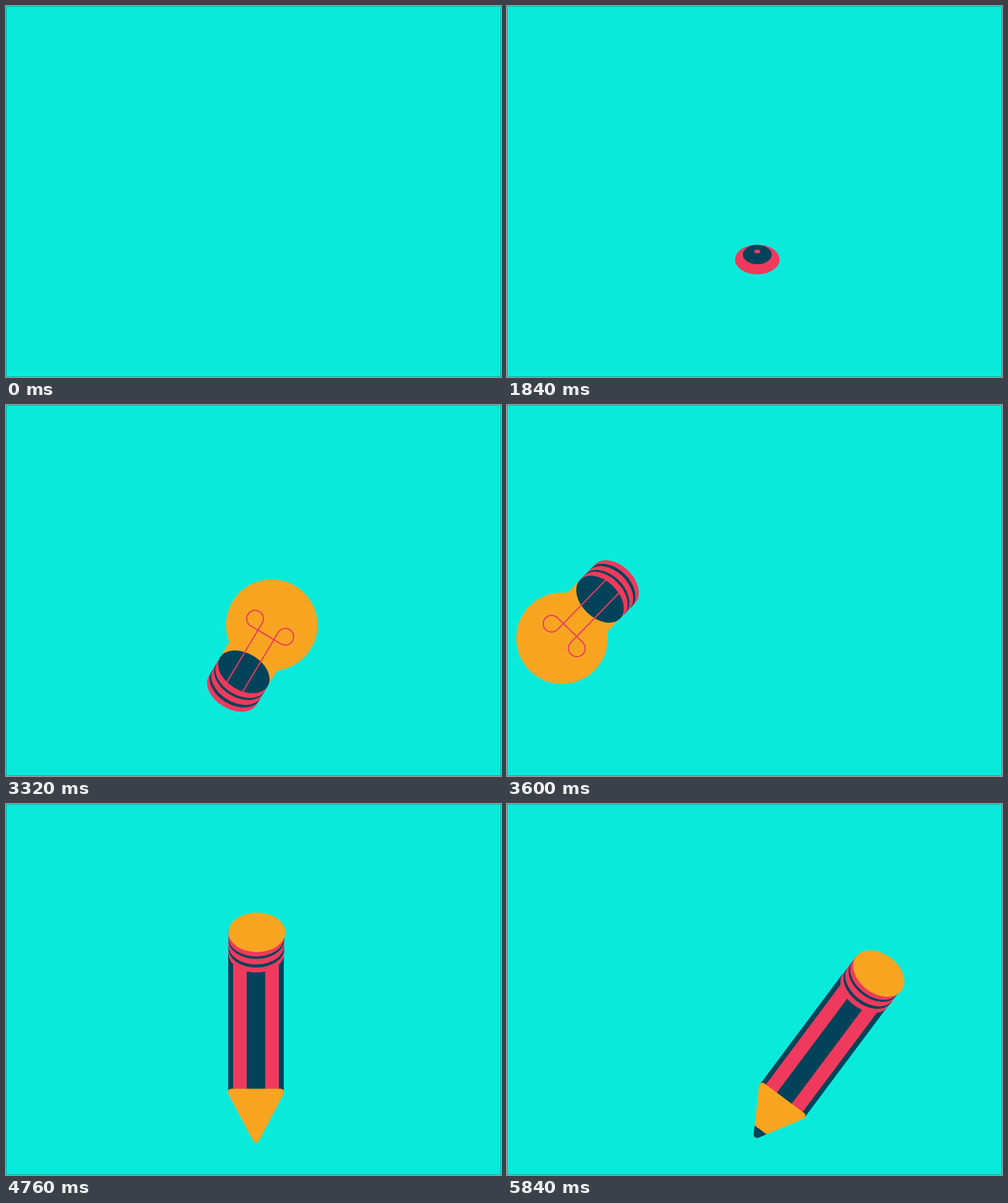
An HTML page with a canvas that plays this animation: 800x600 px, repeating every 6.04 s.

```html
<!DOCTYPE html>
<html>
<head>
<meta charset="utf-8">
<style>
html, body { margin: 0; width: 100%; height: 100%; overflow: hidden; background: #0aeadb }
canvas { display: block }
</style>
</head>
<body>
<canvas id="stage" width="800" height="600"></canvas>
<script>
const c = document.getElementById('stage').getContext('2d');
const TEAL = '#0aeadb', ORANGE = '#f7a521', PINK = '#ef3a5d', NAVY = '#02435a';
const LOOP = 6040, STEP = 40, RAD = Math.PI / 180, X = 404.5;
const PIVOT = { x: 403, y: 534.5 };
const LAYERS = [410, 402, 397, 388, 384, 375];

const span = (t, a, b) => Math.min(1, Math.max(0, (t - a) / (b - a)));
const mix = (a, b, k) => a + (b - a) * k;
const sine = u => (1 - Math.cos(Math.PI * u)) / 2;
const inOut = u => u < .5 ? 4 * u ** 3 : 1 - (2 - 2 * u) ** 3 / 2;
const backOut = (u, s = 1.7) => u <= 0 ? 0 : 1 + (s + 1) * (u - 1) ** 3 + s * (u - 1) ** 2;
const hermite = (u, a, va, b, vb) =>
  a * (2 * u ** 3 - 3 * u * u + 1) + va * (u ** 3 - 2 * u * u + u) +
  b * (3 * u * u - 2 * u ** 3) + vb * (u ** 3 - u * u);
const bezier = (s, p0, p1, p2, p3) => {
  const r = 1 - s;
  return r ** 3 * p0 + 3 * r * r * s * p1 + 3 * r * s * s * p2 + s ** 3 * p3;
};

function oval(x, y, rx, ry, color) {
  if (rx <= 0) return;
  c.fillStyle = color;
  c.beginPath();
  c.ellipse(x, y, rx, ry, 0, 0, 2 * Math.PI);
  c.fill();
}

function box(x, y, w, h, color) {
  c.fillStyle = color;
  c.fillRect(x, y, w, h);
}

function turn(x, y, deg) {
  c.translate(x, y);
  c.rotate(deg * RAD);
  c.translate(-x, -y);
}

function ball(t) {
  if (t <= 0 || t >= 1760) return;
  const s = 1 - (1 - span(t, 0, 1290)) ** 3.2;
  const fall = span(t, 1290, 1760) ** 2;
  const x = bezier(s, -14, 300, 500, 406) - 1.5 * fall;
  const y = bezier(s, 366, 366, 260, 110) + 300 * fall;
  oval(x, y, 13, 13, PINK);
}

// The bulb drops away, loops clockwise and lands with a wobble.
function loopPose(t) {
  if (t <= 3040 || t >= 4220) return;
  if (t >= 3860) {
    const d = t - 3860;
    const fade = 1 - span(t, 4140, 4220);
    turn(X, 440, 11 * fade * Math.exp(-d / 300) * Math.sin(2 * Math.PI * d / 180));
    return;
  }
  const turns = t < 3320
    ? .051 * ((t - 3040) / 280) ** 2
    : hermite((t - 3320) / 540, .051, .197, 1, .6);
  const phi = Math.min(1, turns) * 2 * Math.PI;
  const lead = 45 * Math.max(0, Math.sin(phi / 2)) ** .7;
  c.translate(-280 * ((1 - Math.cos(phi)) / 2) ** 1.5, 196 * Math.sin(phi));
  turn(X, 338, phi / RAD + lead);
}

function tilt(t) {
  const keys = [[5040, 0], [5200, -10], [5500, 41.5], [5680, 33.8], [5800, 36.8]];
  let angle = 0;
  for (let i = 1; i < keys.length; i++) {
    const [a, from] = keys[i - 1], [b, to] = keys[i];
    if (t >= a) angle = mix(from, to, sine(span(t, a, b)));
  }
  return angle;
}

function trail(t, lag, color) {
  const a = tilt(t - lag) * RAD, b = tilt(t) * RAD;
  if (t < 5200 || t > 5680 || a >= b) return;
  const at = (x, y, r) => [
    PIVOT.x + x * Math.cos(r) - y * Math.sin(r),
    PIVOT.y + x * Math.sin(r) + y * Math.cos(r)
  ];
  c.fillStyle = color;
  c.beginPath();
  c.moveTo(...at(0, -72, a));
  c.lineTo(...at(-42.5, -72, a));
  c.arc(PIVOT.x, PIVOT.y, 332.5, a - Math.PI / 2 - .128, b - Math.PI / 2);
  c.lineTo(...at(0, -72, b));
  c.fill();
}

function cone(y, tip, color) {
  c.beginPath();
  c.moveTo(X - 40.5, y);
  c.lineTo(X + 39.5, y);
  c.lineTo(X - .5, tip);
  c.closePath();
  c.fillStyle = c.strokeStyle = color;
  c.lineWidth = 11;
  c.lineJoin = 'round';
  c.fill();
  c.stroke();
}

function pencilBody(t, grow, lift) {
  if (grow <= 0) return;
  const top = 410 - lift, bottom = mix(410, 466, grow), h = bottom - top;
  box(359, top, 90, h, NAVY);
  box(367, top, 22, h, PINK);
  box(419, top, 22, h, PINK);
  const tip = mix(434, 542, grow) - 8 * sine(span(t, 4800, 5000));
  cone(bottom, tip, ORANGE);
  const lead = sine(span(t, 4820, 5040));
  if (lead > 0) {
    c.save();
    c.beginPath();
    c.rect(340, mix(550, 524.5, lead), 130, 60);
    c.clip();
    cone(bottom, tip, NAVY);
    c.restore();
  }
}

function glass(t, lift) {
  const u = span(t, 2080, 2560), shrink = span(t, 4560, 4730) ** 2;
  if (u <= 0 || shrink >= 1) return;
  const y = 375 - lift, rise = 88 * backOut(u, 2.5) * (1 - shrink);
  const r = 74 * (1 - (1 - u) ** 3) * (1 - shrink);
  const neck = Math.min(45, r * .8);
  oval(X, y - rise, r, r, ORANGE);
  c.beginPath();
  c.moveTo(X - neck, y);
  c.lineTo(X - neck, y - rise * .3);
  c.quadraticCurveTo(X - neck, y - rise * .36, X - neck - r * .05, y - rise + r * .74);
  c.lineTo(X + neck + r * .05, y - rise + r * .74);
  c.quadraticCurveTo(X + neck, y - rise * .36, X + neck, y - rise * .3);
  c.lineTo(X + neck, y);
  c.fill();
}

function socket(t, lift) {
  const size = LAYERS.map((_, i) => 45 * backOut(span(t, 1760 + 36 * i, 2090 + 36 * i)));
  LAYERS.forEach((y, i) => {
    const color = i % 2 ? NAVY : PINK, next = LAYERS[i + 1];
    oval(X, y - lift, size[i], size[i] * 2 / 3, color);
    if (next) box(X - size[i + 1], next - lift, 2 * size[i + 1], y - next, color);
  });
  const cap = sine(span(t, 4560, 4720));
  oval(X + 1, 375 - lift, 46 * cap, 32 * cap, ORANGE);
}

function filament(t, lift) {
  const shown = span(t, 2560, 3060) - span(t, 4200, 4440);
  if (shown <= 0) return;
  const loopY = 292 - lift, foot = 404 - lift, r = 13.5;
  c.beginPath();
  c.moveTo(X - 15, foot);
  c.lineTo(X - 15, loopY);
  c.arc(X - 28.5, loopY, r, 0, Math.PI / 2, true);
  c.lineTo(X + 28.5, loopY + r);
  c.arc(X + 28.5, loopY, r, Math.PI / 2, Math.PI, true);
  c.lineTo(X + 15, foot);
  c.strokeStyle = PINK;
  c.lineWidth = 2;
  c.setLineDash([409 * shown, 999]);
  c.stroke();
  c.setLineDash([]);
}

function draw(t) {
  box(0, 0, 800, 600, TEAL);
  ball(t);
  trail(t, 132, ORANGE);
  trail(t, 75, PINK);
  c.save();
  loopPose(t);
  turn(PIVOT.x, PIVOT.y, tilt(t));
  const grow = inOut(span(t, 4220, 4580));
  const lift = 167.5 * grow + 6 * Math.sin(Math.PI * span(t, 4500, 4700));
  pencilBody(t, grow, lift);
  glass(t, lift);
  socket(t, lift);
  filament(t, lift);
  c.restore();
  c.strokeStyle = '#08a8a0';
  c.lineWidth = 1;
  c.strokeRect(.5, .5, 799, 599);
}

const start = performance.now();
function tick() {
  const t = (performance.now() - start) % LOOP;
  draw(Math.min(5840, Math.floor(t / STEP) * STEP));
  requestAnimationFrame(tick);
}
tick();
</script>
</body>
</html>
```
